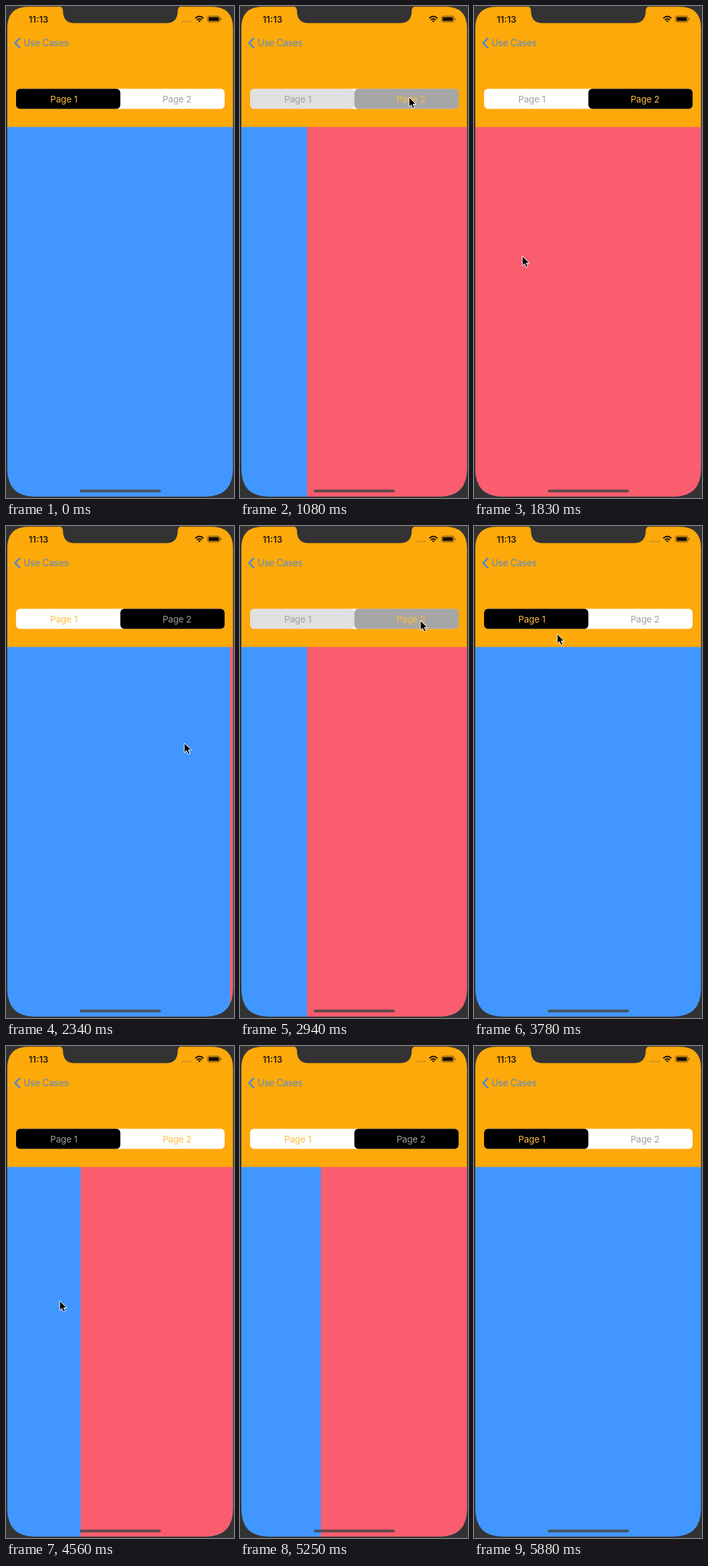
Recreate the animation shown at these times as an HTML page. Size 340x734 px, loop 5910 ms.

```html
<!DOCTYPE html>
<html lang="en">
<head>
<meta charset="utf-8">
<title>Paged tabs</title>
<style>
  html, body { margin: 0; width: 100%; height: 100%; overflow: hidden; background: #333; }
  svg { display: block; width: 340px; height: 734px; font-family: Inter, "Liberation Sans", sans-serif; }
  .tab { font-size: 13.5px; letter-spacing: -.2px; text-anchor: middle; }
</style>
</head>
<body>
<svg viewBox="0 0 340 734">
  <clipPath id="screen"><path d="M2 33Q2 1 34 1H306Q338.500 1 338.500 33V690Q338.500 732 297 732H43Q2 732 2 690Z"/></clipPath>
  <g clip-path="url(#screen)">
    <rect y="180" width="340" height="554" fill="#4296ff"/>
    <rect id="second" y="180" width="340" height="554" fill="#fa5d6d"/>
    <rect width="340" height="180.500" fill="#fda90a"/>
  </g>
  <path d="M78 0Q85 1 85 7V9Q86 25.500 102 25.500H239Q255 25.500 256 9V7Q256 1 263 0Z" fill="#333"/>

  <text x="48.500" y="24.500" font-size="13.300" font-weight="600" text-anchor="middle" fill="#2b1d10">11:13</text>
  <g id="signal" fill="#b98126">
    <circle cx="263.500" cy="23" r="1.200"/><circle cx="267.500" cy="23" r="1.200"/>
    <circle cx="271.500" cy="23" r="1.200"/><circle cx="275.500" cy="23" r="1.200"/>
  </g>
  <g fill="none" stroke="#160e05" stroke-width="2">
    <path d="M282.300 18.200Q288.300 12.800 294.300 18.200M284.600 20.800Q288.300 17.600 292 20.800"/>
    <path d="M286.300 22.200Q288.300 20.700 290.300 22.200L288.300 24.300Z" fill="#160e05" stroke="none"/>
    <rect x="300.500" y="15" width="18.500" height="9" rx="2.500" stroke="#7a5414" stroke-width="1"/>
    <rect x="302" y="16.500" width="15.500" height="6" rx="1.200" fill="#160e05" stroke="none"/>
    <path d="M320.800 18V21" stroke="#7a5414" stroke-width="1.200"/>
  </g>

  <path d="M21 47.500L13.500 55.200L21 63" fill="none" stroke="#4a8ad8" stroke-width="2.500"/>
  <text x="26" y="60" font-size="14" letter-spacing="-.4" fill="#5a8cc0">Use Cases</text>

  <rect x="15" y="123.500" width="311" height="30" rx="6" fill="#fff"/>
  <rect class="pill" x="15" y="123.500" width="155.500" height="30" rx="6"/>
  <rect class="pill" x="170.500" y="123.500" width="155.500" height="30" rx="6"/>
  <text class="tab" x="86.300" y="143.800">Page 1</text>
  <text class="tab" x="255" y="143.800">Page 2</text>

  <rect x="110" y="721.500" width="121" height="4" rx="2" fill="#484848" fill-opacity=".88"/>
  <path id="cursor" d="M0 0V14.500L3.400 11.500L5.700 16.800L8.300 15.700L6 10.500H10.500Z" stroke="#fff" stroke-width="1"/>
</svg>
<script>
const LOOP = 5910, STEP = 30;

// start, duration, page, time at which the tab selection flips
const turns = [
  [887, 300, 1, 887],
  [1950, 420, 0, 2230],
  [2747, 300, 1, 2747],
  [3350, 300, 0, 3350],
  [4300, 420, 1, 4560],
  [5130, 300, 0, 5130]
];

// time, x, y of the pointer
const path = [
  [550, 345, 300], [800, 252, 136], [1180, 252, 136], [1700, 72, 373],
  [1950, 72, 373], [2230, 265, 373], [2600, 269, 141], [3000, 269, 141],
  [3280, 90, 140], [3600, 90, 140], [3780, 124, 161], [4150, 270, 380],
  [4300, 270, 380], [4560, 80, 380], [4980, 91, 139], [5130, 91, 139]
];

const $ = id => document.getElementById(id);
const pills = document.querySelectorAll('.pill');
const labels = document.querySelectorAll('.tab');
const clamp = v => Math.max(0, Math.min(1, v));
const ease = v => { v = clamp(v); return v * v * (3 - 2 * v); };
const mix = (a, b, p) => a + (b - a) * p;

function drawPages(t) {
  let position = 0, selected = 0, since = 1e4;
  for (const [start, duration, page, flip] of turns) {
    if (t >= start) position = mix(1 - page, page, ease((t - start) / duration));
    if (t >= flip) { selected = page; since = t - flip; }
  }
  $('second').setAttribute('x', 2 + 337 * (1 - position));
  // the old pill fades faster than the new one appears
  pills[selected].setAttribute('opacity', clamp((since - 120) / 210));
  pills[1 - selected].setAttribute('opacity', 1 - clamp((since - 120) / 83));
  labels.forEach((label, i) => label.setAttribute('fill', i === selected ? '#fcbd3c' : '#a0a0a0'));
}

function drawCursor(t) {
  const next = path.findIndex(point => point[0] > t);
  $('cursor').style.display = next > 0 ? '' : 'none';
  if (next < 1) return;
  const [t0, x0, y0] = path[next - 1], [t1, x1, y1] = path[next];
  const p = ease((t - t0) / (t1 - t0));
  $('cursor').setAttribute('transform', `translate(${mix(x0, x1, p)} ${mix(y0, y1, p)})`);
}

function draw() {
  const t = Math.floor(performance.now() % LOOP / STEP) * STEP;
  drawPages(t);
  drawCursor(t);
  $('signal').style.display = t > 600 && t < 2400 ? 'none' : '';
  requestAnimationFrame(draw);
}
draw();
</script>
</body>
</html>
```
